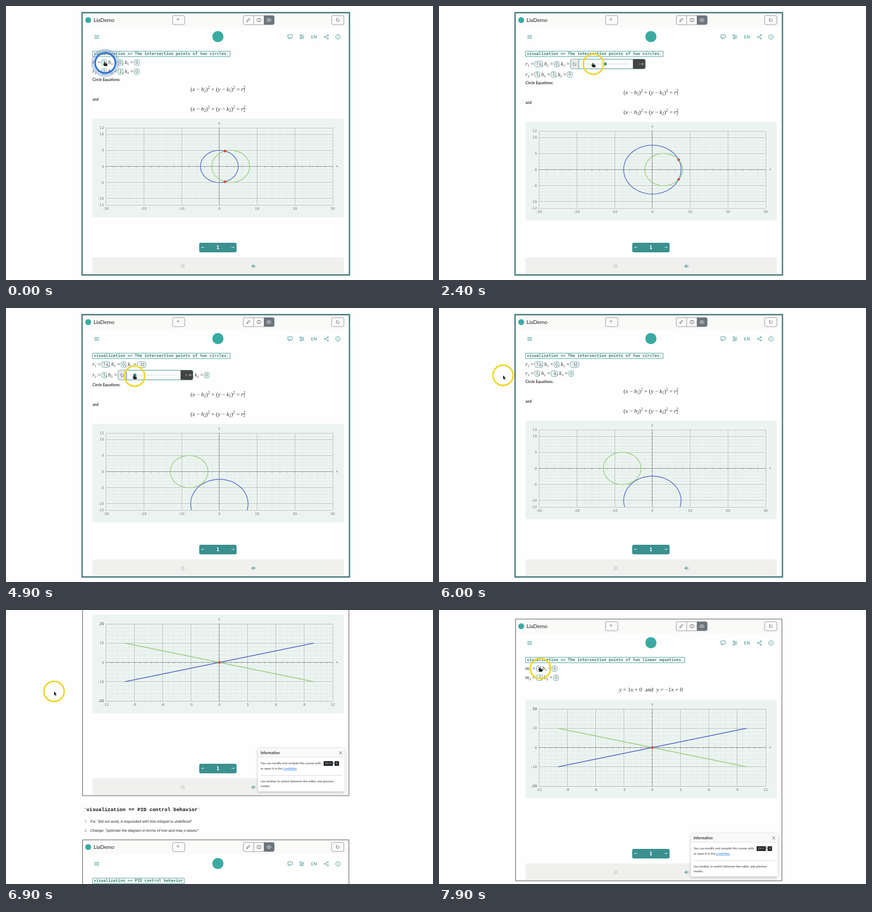
These frames come from a looping animation (800x515 px, 8000 ms). An HTML page with a canvas:

```html
<!DOCTYPE html>
<html lang="en">
<head>
<meta charset="utf-8">
<title>Interactive course demo</title>
<style>
html, body { margin: 0; width: 800px; height: 515px; overflow: hidden; background: #fefefe; }
canvas { display: block; }
</style>
</head>
<body>
<canvas id="stage" width="800" height="515"></canvas>
<script>
const c = document.getElementById('stage').getContext('2d');
const TEAL = '#3a9190', GRAY = '#6e7079', BLUE = '#5266c8', GREEN = '#98cb7c';
const SANS = 'Lato, sans-serif', MONO = '"DejaVu Sans Mono", monospace', AXIS = '"DejaVu Sans", sans-serif';
const LOOP = 8000;

// Linear interpolation through [time, value, ...] points
function track(points, t) {
  let i = 1;
  while (i < points.length - 1 && points[i][0] < t) i++;
  const a = points[i - 1], b = points[i];
  const p = Math.min(1, Math.max(0, (t - a[0]) / (b[0] - a[0])));
  return a.slice(1).map((v, n) => v + (b[n + 1] - v) * p);
}

function text(s, x, y, font, color = '#333', align = 'left') {
  c.font = font;
  c.fillStyle = color;
  c.textAlign = align;
  c.textBaseline = 'middle';
  c.fillText(s, x, y);
  return x + c.measureText(s).width;
}

function box(x, y, w, h, r, fill, stroke, width = 1) {
  c.beginPath();
  c.roundRect(x, y, w, h, r);
  if (fill) { c.fillStyle = fill; c.fill(); }
  if (stroke) { c.strokeStyle = stroke; c.lineWidth = width; c.stroke(); }
}

function line(points, color, width = 1) {
  c.beginPath();
  points.forEach(([x, y]) => c.lineTo(x, y));
  c.strokeStyle = color;
  c.lineWidth = width;
  c.stroke();
}

function disc(x, y, r, fill, stroke, width = 1) {
  c.beginPath();
  c.arc(x, y, r, 0, 7);
  if (fill) { c.fillStyle = fill; c.fill(); }
  if (stroke) { c.strokeStyle = stroke; c.lineWidth = width; c.stroke(); }
}

// Math text: letters in italics, _ and ^ mark one-letter scripts, ~ toggles upright
function math(s, x, y, size = 10.8, draw = true) {
  let upright = false;
  for (let i = 0; i < s.length; i++) {
    let ch = s[i], dy = 0, scale = 1;
    if (ch === '~') { upright = !upright; continue; }
    if (ch === '_' || ch === '^') {
      dy = ch === '_' ? 2.3 : -3.6;
      scale = 0.68;
      ch = s[++i];
    }
    const italic = /[a-z]/i.test(ch) && !upright ? 'italic ' : '';
    c.font = `${italic}${size * scale}px "Liberation Serif", serif`;
    c.fillStyle = '#333';
    c.textAlign = 'left';
    c.textBaseline = 'alphabetic';
    if (draw) c.fillText(ch, x, y + size * 0.3 + dy);
    if (!(dy > 0 && s[i + 1] === '^')) x += c.measureText(ch).width;
  }
  return x;
}

function mathCenter(s, y) {
  math(s, 397 - math(s, 0, 0, 10.8, false) / 2, y);
}

function reload(x, y, color) {
  c.beginPath();
  c.arc(x, y, 2.6, -0.9, 4.2);
  c.strokeStyle = color;
  c.lineWidth = 0.9;
  c.stroke();
  line([[x - 2, y - 4], [x - 0.6, y - 2.4], [x - 2.6, y - 1.4]], color, 0.8);
}

function slider(x, y, value, [min, max]) {
  box(x, y - 9, 140, 18, 3, '#fefefe', TEAL);
  box(x + 0.5, y - 8.5, 14.5, 17, 2, '#e8eae9');
  line([[x + 15.5, y - 9], [x + 15.5, y + 9]], TEAL);
  reload(x + 7.5, y + 0.5, '#666');
  line([[x + 23, y], [x + 110, y]], '#cfd6d5');
  disc(x + 23 + 84 * (value - min) / (max - min), y, 3, TEAL);
  box(x + 117, y - 9, 23, 18, [0, 3, 3, 0], '#444');
  text('= ' + value, x + 137, y, '6.3px ' + SANS, '#fff', 'right');
}

// One line of inputs: [label, value, range]; the open one shows its slider
function inputs(items, y, open, first = 17.5, next = 21.5) {
  let x = 162;
  items.forEach(([label, value, range], i) => {
    const s = (i ? ', ' : '') + label + ' =';
    x += i ? next : first;
    math(s, x - 2 - math(s, 0, 0, 10, false), y, 10);
    if (label === open) {
      slider(x, y, value, range);
      x += 140;
    } else {
      c.font = '7px ' + SANS;
      const w = c.measureText(value).width + 5;
      box(x, y - 5, w, 10.5, 3, null, TEAL, 0.8);
      text(value, x + w / 2, y + 0.5, '7px ' + SANS, '#333', 'center');
      x += w;
    }
  });
}

const range = (a, b, step) => Array.from({ length: Math.round((b - a) / step) + 1 }, (_, i) => a + i * step);

function chart(top, o) {
  const [x0, x1] = o.x, [y0, y1] = o.y, t = top + 17, b = top + 162;
  const px = x => 187.5 + (x - x0) / (x1 - x0) * 424.5;
  const py = y => b - (y - y0) / (y1 - y0) * 145;
  const snap = v => Math.round(v - 0.5) + 0.5;
  const vline = (x, color) => line([[snap(px(x)), t], [snap(px(x)), b]], color, 0.8);
  const hline = (y, color) => line([[187, snap(py(y))], [612, snap(py(y))]], color, 0.8);
  const xs = range(x0, x1, o.dx);
  const low = Math.ceil(y0 / o.dy) * o.dy;
  const ys = [y0, ...range(low, Math.floor(y1 / o.dy) * o.dy, o.dy), y1];

  box(162, top, 471, 185, 4, '#ebf4f0');
  c.save();
  c.beginPath();
  c.rect(163, top, 468, 185);
  c.clip();
  c.setLineDash([2, 1]);
  range(x0, x1, o.dx / 5).forEach(x => vline(x, '#e0e9e5'));
  range(low - o.dy, y1, o.dy / 5).filter(y => y > y0 && y < y1).forEach(y => hline(y, '#d9e2de'));
  c.setLineDash([]);
  xs.forEach(x => vline(x, '#b1bab7'));
  ys.forEach(y => hline(y, '#b1bab7'));
  hline(0, '#7f8785');
  vline(0, '#7f8785');
  range(x0, x1, o.dx / 5).forEach(x => line([[px(x), py(0)], [px(x), py(0) + 2]], GRAY, 0.6));
  range(low, y1, o.dy / 5).forEach(y => line([[px(0) - 2, py(y)], [px(0), py(y)]], GRAY, 0.6));

  const font = '6.4px ' + AXIS;
  xs.forEach(x => text(x, px(x), b + 7, font, GRAY, 'center'));
  ys.forEach(y => text(y === y1 && o.max || y, 183.5, py(y) + 0.5, font, GRAY, 'right'));
  text(o.names[1], px(0), top + 8, font, GRAY, 'center');
  text(o.names[0], 618.5, py(0), font, GRAY);

  c.beginPath();
  c.rect(187, t, 425, 145);
  c.clip();
  o.curves.forEach((pts, i) => line(pts.map(([x, y]) => [px(x), py(y)]), i ? GREEN : BLUE, 1.3));
  (o.dots || []).forEach(([x, y]) => {
    disc(px(x), py(y), 2.1, '#e8523f', '#a33a32', 0.8);
  });
  c.restore();
}

function toolbar(y) {
  box(144, y + 1, 498, 26, 0, '#fafaf9');
  disc(154, y + 14, 5.5, '#3aaba3');
  text('LiaDemo', 164, y + 14, '10px ' + SANS, '#222');
  const mid = y + 14, top = y + 5.5;
  [[312, 23], [444.5, 58], [610, 23]].forEach(([x, w]) => box(x, top, w, 17, 3, null, '#8b9095', 0.9));
  box(483, top, 19.5, 17, [0, 3, 3, 0], '#6c757d');
  line([[464, top], [464, top + 17]], '#8b9095', 0.9);
  c.beginPath();
  c.arc(323.5, mid, 3.2, -1.8, 3.4, true);
  c.quadraticCurveTo(325, mid + 1.5, 323, mid - 3.2);
  c.strokeStyle = '#666';
  c.lineWidth = 0.8;
  c.stroke();
  line([[451, mid + 3], [452, mid], [455.5, mid - 3.5], [457, mid - 2], [453.5, mid + 2], [451, mid + 3]], '#555', 0.9);
  box(470.5, mid - 3, 7, 6, 1, null, '#666', 0.8);
  line([[474, mid - 3], [474, mid + 3]], '#666', 0.8);
  c.beginPath();
  c.ellipse(492.5, mid, 4, 2.6, 0, 0, 7);
  c.strokeStyle = '#fff';
  c.lineWidth = 0.8;
  c.stroke();
  disc(492.5, mid, 1, '#fff');
  reload(621.5, mid, '#555');
}

function menu(y) {
  [-2.5, 0, 2.5].forEach(d => line([[165.5, y + d], [174.5, y + d]], TEAL, 0.9));
  disc(397, y - 0.5, 10.5, '#3aaba3');
  box(528, y - 4, 8.5, 6, 1, null, TEAL, 0.9);
  line([[530, y + 2], [530, y + 4], [532, y + 2]], TEAL, 0.9);
  [-3, 0, 3].forEach((d, i) => {
    line([[550, y + d], [558.5, y + d]], TEAL, 0.8);
    disc([552, 556, 553][i], y + d, 1.1, '#fff', TEAL, 0.8);
  });
  text('EN', 577, y + 0.5, '8.3px ' + SANS, TEAL, 'center');
  line([[603, y - 3], [597.5, y], [603, y + 3]], TEAL, 0.8);
  [[603, -3], [597.5, 0], [603, 3]].forEach(([x, d]) => disc(x, y + d, 1.3, '#fff', TEAL, 0.8));
  disc(622, y, 4.2, null, TEAL, 0.9);
  text('i', 622, y + 0.3, 'bold 6px ' + SANS, TEAL, 'center');
}

function footer(y) {
  box(362, y + 432.5, 70, 18, 3, TEAL);
  [['←', 369], ['1', 397], ['→', 425]].forEach(([s, x]) =>
    text(s, x, y + 442, (s === '1' ? 'bold 8px ' : '7.5px ') + AXIS, '#fff', 'center'));
  box(162, y + 460, 471, 31, [3, 3, 0, 0], '#f0f0ef');
  const m = y + 476.5;
  disc(331, m, 3.3, null, '#bbb', 0.8);
  line([[329.7, m - 1.3], [332.3, m + 1.3]], '#bbb', 0.8);
  line([[329.7, m + 1.3], [332.3, m - 1.3]], '#bbb', 0.8);
  box(460, m - 1.2, 2, 2.4, 0, TEAL);
  line([[462, m - 2], [463.5, m - 3], [463.5, m + 3], [462, m + 2]], TEAL, 0.9);
  [465, 466.6].forEach(x => line([[x, m - 2], [x, m + 2]], TEAL, 0.7));
}

function popup(y) {
  const font = '5.8px ' + SANS;
  c.save();
  c.shadowColor = 'rgba(0,0,0,.25)';
  c.shadowBlur = 5;
  c.shadowOffsetY = 1;
  box(472, y, 162.5, 81, 2, '#fff');
  c.restore();
  box(472, y, 162.5, 16.5, [2, 2, 0, 0], '#f9f9f9');
  line([[472, y + 16.5], [634, y + 16.5]], '#ddd', 0.8);
  text('Information', 477, y + 8.5, 'bold 6.8px ' + SANS);
  line([[624, y + 5.5], [630, y + 11.5]], '#555', 0.9);
  line([[630, y + 5.5], [624, y + 11.5]], '#555', 0.9);
  text('You can modify and compile this course with', 477, y + 28.5, font);
  box(595, y + 24, 17.5, 9, 1.5, '#212529');
  text('Ctrl', 603.7, y + 28.7, '5.2px ' + MONO, '#fff', 'center');
  text('+', 614, y + 28.5, font, '#333', 'center');
  box(615.5, y + 24, 8.5, 9, 1.5, '#212529');
  text('S', 619.8, y + 28.7, '5.2px ' + MONO, '#fff', 'center');
  const a = text('or open it in the ', 477, y + 38.3, font);
  const b = text('LiveEditor', a, y + 38.3, font, '#1a73e8');
  line([[a, y + 41.3], [b, y + 41.3]], '#1a73e8', 0.6);
  text('.', b, y + 38.3, font);
  line([[477, y + 51], [630, y + 51]], '#ccc', 0.8);
  text('Use toolbar to switch between the editor and preview', 477, y + 62.5, font);
  text('modes.', 477, y + 71.5, font);
}

function course(y, title, body, active) {
  if (y > 515 || y < -500) return;
  box(143, y, 500, 492, 0, '#fefefe');
  toolbar(y);
  menu(y + 45.5);
  const font = 'bold 7.5px ' + MONO;
  c.font = font;
  box(162, y + 72.5, c.measureText(title).width + 5, 10, 0, null, TEAL, 0.9);
  text(title, 164.5, y + 78, font, '#2f8068');
  body(y);
  footer(y);
  if (!active) popup(y + 403.5);
  if (active) box(142.5, y, 501, 493, 0, null, '#40777a', 2.4);
  else box(143.5, y + 0.5, 499, 492, 0, null, '#555');
}

const ring = (h, k, r) => range(0, 120, 1).map(i => {
  const a = i * Math.PI / 60;
  return [h + r * Math.cos(a), k + r * Math.sin(a)];
});

function crossings(h1, k1, r1, h2, k2, r2) {
  const dx = h2 - h1, dy = k2 - k1, d = Math.hypot(dx, dy);
  if (!d || d > r1 + r2 || d < Math.abs(r1 - r2)) return [];
  const a = (r1 * r1 - r2 * r2 + d * d) / (2 * d), q = Math.sqrt(r1 * r1 - a * a);
  return [1, -1].map(s => [h1 + (a * dx - s * q * dy) / d, k1 + (a * dy + s * q * dx) / d]);
}

function circles(y, t) {
  const r1 = Math.round(track([[300, 5], [1200, 7.6]], t)[0] * 10) / 10;
  const k1 = Math.round(track([[2500, 0], [3300, -10]], t)[0]);
  const h2 = Math.round(track([[4500, 3], [4900, -8]], t)[0]);
  const open = t >= 100 && t < 1700 ? 'r_1' : t >= 2200 && t < 3900 ? 'k_1' : t >= 4300 && t < 5600 ? 'h_2' : '';
  const wide = [-10, 10];
  const shift = open ? 6 : 0, upper = /1/.test(open) ? 3 : 0;
  inputs([['r_1', r1, [0, 10]], ['h_1', 0, wide], ['k_1', k1, wide]], y + 93.5 + upper, open);
  inputs([['r_2', 5, [0, 10]], ['h_2', h2, wide], ['k_2', 0, wide]], y + 110.5 + (upper ? 5.5 : shift / 2), open);
  y += shift;
  text('Circle Equations:', 162, y + 126, 'bold 7px ' + SANS);
  text('and', 162, y + 163, 'bold 7px ' + SANS);
  [1, 2].forEach(n => mathCenter(`(x − h_${n})^2 + (y − k_${n})^2 = r_${n}^2`, y + 107 + 37 * n));
  chart(y + 199.5, {
    x: [-30, 30], dx: 10, y: [-12, 12], dy: 5, names: ['x', 'y'],
    curves: [ring(0, k1, r1), ring(h2, 0, 5)],
    dots: crossings(0, k1, r1, h2, 0, 5)
  });
}

function pid(y) {
  inputs([['K_p', 1], ['K_i', 1], ['K_d', 0]], y + 93.5, '', 21, 24);
  text('PID Control:', 162, y + 110.5, 'bold 7px ' + SANS);
  const x = math('u(t) = K_pe(t) + K_i ∫ e(t) dt + K_d', 203, y + 110.5, 11);
  math('de(t)', x + 2, y + 106.8, 6.8);
  math('dt', x + 7, y + 114.5, 6.8);
  line([[x + 1, y + 111], [x + 17, y + 111]], '#333', 0.6);
  const w = Math.PI / 6;
  chart(y + 126.5, {
    x: [0, 21], dx: 3, y: [-0.795, 2.2], dy: 0.5, max: '2.19119535', names: ['Time', 'Process Variable'],
    curves: [range(0, 19.9, 0.1).map(s => [s, 1 - 0.8 * Math.exp(-0.462 * s) * (Math.cos(w * s) - Math.sin(w * s))])]
  });
}

function lines(y) {
  inputs([['m_1', 1], ['b_1', 0]], y + 93.5, '', 20.5, 20.5);
  inputs([['m_2', -1], ['b_2', 0]], y + 110.5, '', 20.5, 20.5);
  mathCenter('y = 1x + 0  ~and~  y = −1x + 0', y + 133.5);
  chart(y + 152.5, {
    x: [-12, 12], dx: 3, y: [-20, 20], dy: 10, names: ['x', 'y'],
    curves: [[[-10, -10], [10, 10]], [[-10, 10], [10, -10]]],
    dots: [[0, 0]]
  });
}

function heading(s, y) {
  text('`' + s + '`', 145, y, 'bold 9.4px "Liberation Mono", monospace', '#111');
}

function item(n, label, quote, y) {
  const font = '7.2px Roboto, sans-serif';
  text(n + '.', 147, y, font, '#777');
  text('“' + quote + '”', text(label + ': ', 158, y, font), y, 'italic ' + font);
}

function pointer(t) {
  const [x, y] = track([
    [0, 186, 107], [100, 186, 107], [300, 245, 110], [1200, 263, 110], [1500, 263, 110], [1700, 282, 122],
    [2100, 245, 108], [2200, 246, 108], [2500, 311, 110], [3300, 271, 110], [3600, 271, 110], [3900, 290, 122],
    [4200, 216, 124], [4300, 216, 124], [4500, 288, 128], [4900, 241, 128], [5500, 241, 128],
    [5800, 150, 100], [6200, 90, 153], [7400, 90, 153], [7800, 190, 110]
  ], t);
  const clicked = [0, 2100, 4200].includes(t);
  if (clicked) disc(x, y, 23.5, null, 'rgba(120,155,205,.4)', 6);
  disc(x, y, 19, null, clicked ? '#2f6fd0' : '#f0d733', 3);
  c.save();
  c.translate(x, y);
  if (x < 143) {
    c.beginPath();
    [[0, 0], [0, 7.5], [1.7, 6], [3, 8.8], [4.2, 8.2], [3, 5.5], [5, 5.3]].forEach(p => c.lineTo(...p));
    c.closePath();
    c.fillStyle = '#222';
    c.fill();
  } else {
    box(-1.8, -2, 2.2, 6, 1, '#222');
    box(-2.5, 1, 6.5, 5, 1.8, '#222');
    line([[-3.5, 1], [-1.5, 4]], '#222', 1.4);
  }
  c.restore();
}

function draw(now) {
  const t = Math.floor(now % LOOP / 100) * 100;
  const scroll = track([[6300, 0], [6500, 427], [6900, 961], [7400, 1121]], t)[0];
  const lead = 'visualization == ';
  c.fillStyle = '#fefefe';
  c.fillRect(0, 0, 800, 515);
  course(scroll - 1104.5, lead + 'The intersection points of two linear equations.', lines);
  heading(lead + 'PID control behavior', scroll - 585);
  item(1, 'Fix', 'did not work, it responded with this integral is undefined', scroll - 563);
  item(2, 'Change', 'optimize the diagram in terms of min and max y-values', scroll - 546);
  course(scroll - 529.5, lead + 'PID control behavior', pid);
  heading(lead + 'The intersection points of two circles.', scroll - 10);
  course(scroll + 12.5, lead + 'The intersection points of two circles.', y => circles(y, t), true);
  pointer(t);
  requestAnimationFrame(draw);
}
requestAnimationFrame(draw);
</script>
</body>
</html>
```
